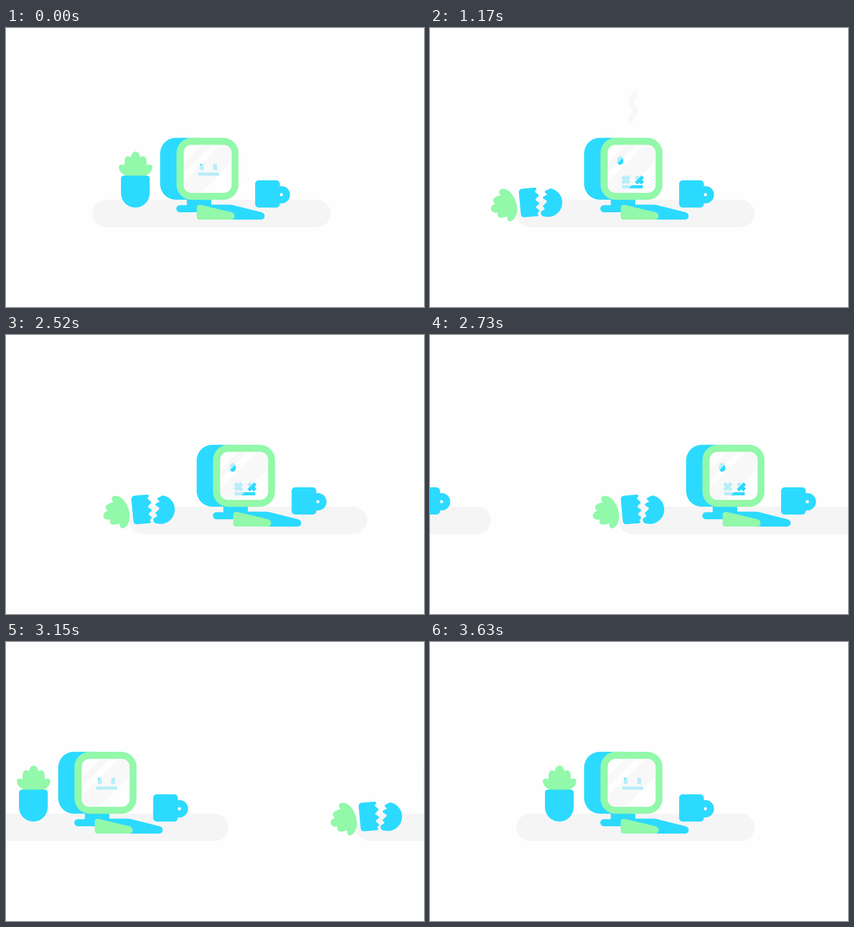
An HTML page for the animation above (3.78 s loop, 800x533 px).

```html
<!DOCTYPE html>
<html lang="en">
<head>
<meta charset="utf-8">
<title>Desk mishap</title>
<style>
  html, body { margin: 0; width: 100%; height: 100%; overflow: hidden; background: #fefefe; }
  svg { display: block; width: 100%; height: 100%; }
</style>
</head>
<body>
<svg id="stage" viewBox="0 0 800 533"></svg>
<script>
const BLUE = '#2cdaff', GREEN = '#92f8aa', GREY = '#f5f5f5', PAPER = '#fefefe';
const LOOP = 3780, STEP = 30, TRAVEL = 700;

const rect = (x, y, w, h, r, fill) =>
  `<rect x="${x}" y="${y}" width="${w}" height="${h}" rx="${r}" fill="${fill}"/>`;
const path = (d, fill) => `<path d="${d}" fill="${fill}"/>`;
// Diagonal glare covering from < x + y < to
const glare = (from, to) =>
  path(`M${from - 200} 200H${to - 200}L${to - 330} 330H${from - 330}Z`, GREY);

const leafPath = 'M216 265.5C216 261 221 260 227 262C226 252 228.500 245 233 245' +
  'C236 245 238 246 239 247.500C240 239.500 244.500 236 248 236' +
  'C251.500 236 256 239.500 257 247.500C258 246 260 245 263 245' +
  'C267.500 245 270 252 269 262C275 260 280 261 280 265.500' +
  'C280 277 266 286 248 286C230 286 216 277 216 265.500Z';
const potPath = 'M220 288Q220 282 226 282H269Q275 282 275 288V315.500A27.5 27.5 0 0 1 220 315.500Z';
const rimPath = 'M170 314Q170 308 176 307L199 305Q204 304.500 203.500 308' +
  'C203 310 200 311 202 314L207 318Q209 320 207 322L203 326Q201 328 203 330' +
  'L208 333Q210 335 208 337L204 340Q202 342 204 344L208 347Q210 349 208 351' +
  'L206 353Q205 355 207 356Q209 359 205 359.500L181 361.500Q175 362 174 356Z';
const bowlPath = 'M229 307Q231 306 233 307A27.5 27.5 0 0 1 226 361L217 360' +
  'Q212 358 212 353Q212 350 215 349L219 346.500Q220 345 218 343L216 341' +
  'Q216 339 218 338L223 333Q225 331 222 329L217 326Q215 324 217 322' +
  'L223 319Q225 318 222 316Q218 313 221 311Z';
const dropPath = 'M364 244C368 245 370 250 370 254C370 263.500 358 263.500 358 254C358 250 360 245 364 244Z';

const cross = x => `<path d="M${x - 6.5} 259l13 13m0 -13l-13 13" stroke="${BLUE}" stroke-width="7.5"/>`;

function desk(id) {
  return `<g id="${id}">
    ${rect(165.5, 328, 455.5, 52.5, 26.2, GREY)}
    <g class="plant">${path(leafPath, GREEN)}${path(potPath, BLUE)}</g>
    <g class="shards" display="none">
      <g class="leaf">${path(leafPath, GREEN)}</g>
      <g class="rim">${path(rimPath, BLUE)}</g>
      ${path(bowlPath, BLUE)}
    </g>
    ${rect(295, 209.7, 100, 118.3, 30, BLUE)}
    ${rect(346, 322, 47, 22, 0, BLUE)}
    ${rect(326, 338.5, 80, 13.5, 6.7, BLUE)}
    ${path('M371 337.500H428Q431 337.500 434 338.300L489 352Q495 354 495 359Q495 366 488 366H400Z', BLUE)}
    ${path('M365 344Q365 336.500 373 338L432 352Q437.500 354 437.500 359Q437.500 366 431 366H371Q365 366 365 360Z', GREEN)}
    ${rect(326.3, 209.7, 118.6, 118.5, 29, GREEN)}
    ${rect(340, 223.3, 91.7, 91.7, 15, PAPER)}
    <clipPath id="${id}Screen">${rect(340, 223.3, 91.7, 91.7, 15, '#000')}</clipPath>
    <g clip-path="url(#${id}Screen)">
      <g class="face">
        <g class="open">${rect(371, 259.5, 7.3, 12, 0, BLUE)}${rect(396.6, 259.5, 7.3, 12, 0, BLUE)}</g>
        <g class="shut" display="none">${cross(375)}${cross(400.5)}</g>
        ${rect(367.7, 276, 39.5, 6, 0, BLUE)}
      </g>
      <g class="drop" opacity="0">${path(dropPath, BLUE)}</g>
      <g opacity=".7">${glare(598, 617)}${glare(634, 687)}</g>
    </g>
    ${rect(476.8, 291, 47.2, 52, 6.5, BLUE)}
    <circle cx="527" cy="318.6" r="16.6" fill="${BLUE}"/>
    <circle cx="527" cy="318.6" r="3" fill="${PAPER}"/>
  </g>`;
}

const stage = document.getElementById('stage');
stage.innerHTML = desk('next') + desk('now') +
  `<path id="smoke" fill="none" stroke="${GREY}" stroke-width="11" stroke-linecap="round" stroke-linejoin="round"/>`;

const next = document.getElementById('next');
const now = document.getElementById('now');
const smoke = document.getElementById('smoke');
const part = name => now.querySelector('.' + name);
const [plant, shards, leaf, rim, face, open, shut, drop] =
  ['plant', 'shards', 'leaf', 'rim', 'face', 'open', 'shut', 'drop'].map(part);

const set = (el, name, value) => el.setAttribute(name, value);
const show = (el, on) => set(el, 'display', on ? 'inline' : 'none');
const span = (t, from, to) => Math.min(1, Math.max(0, (t - from) / (to - from)));
const smooth = u => u * u * (3 - 2 * u);
const easeOut = u => 1 - (1 - u) ** 3;
const mix = (a, b, u) => a + (b - a) * u;

function drawPlant(t) {
  const impact = 1020;
  show(plant, t < impact);
  show(shards, t >= impact);
  const u = span(t, 360, impact);
  set(plant, 'transform',
    `translate(${-22 * u ** 2} ${18.5 * u ** 3.5}) rotate(${-95 * u ** 2} 247.5 315.5)`);
  const k = easeOut(span(t, impact, 1170));
  set(rim, 'transform', `translate(${mix(20, 0, k)} ${mix(-1, 0, k)})`);
  set(leaf, 'transform',
    `translate(${mix(174, 143.5, k)} ${mix(338, 339, k)}) rotate(${mix(-95, -107, k)}) translate(-248 -264)`);
}

function drawFace(t) {
  const dead = t >= 540;
  show(open, !dead);
  show(shut, dead);
  const s = mix(0.5, 1, easeOut(span(t, 540, 690)));
  set(shut, 'transform', `translate(387.700 265.500) scale(1 ${s}) translate(-387.700 -265.500)`);
  set(face, 'transform', `translate(0 ${24.3 * smooth(span(t, 630, 1140))})`);
  set(drop, 'opacity', span(t, 750, 870));
  set(drop, 'transform', `translate(0 ${mix(-6, 0, smooth(span(t, 840, 1170)))})`);
}

function drawSmoke(t) {
  const head = mix(205, 126, span(t, 720, 1170)) - 20 * span(t, 1170, 1650);
  const tail = mix(205, 174, span(t, 960, 1170)) - 40 * span(t, 1170, 1650);
  let d = '';
  for (let y = tail; y >= head; y -= 2) {
    const x = 388.5 + 4 * Math.cos(2 * Math.PI * (y - 158) / 33);
    d += `${d ? 'L' : 'M'}${x.toFixed(2)} ${y.toFixed(2)}`;
  }
  set(smoke, 'd', d);
  set(smoke, 'opacity', 0.6 * span(t, 720, 870) * (1 - span(t, 1170, 1650)));
}

function draw(time) {
  const t = Math.floor((time % LOOP) / STEP) * STEP;
  const x = TRAVEL * smooth(span(t, 2250, 3630));
  set(now, 'transform', `translate(${x} 0)`);
  set(next, 'transform', `translate(${x - TRAVEL} 0)`);
  drawPlant(t);
  drawFace(t);
  drawSmoke(t);
}

function tick() {
  draw(performance.now());
  requestAnimationFrame(tick);
}
tick();
</script>
</body>
</html>
```
